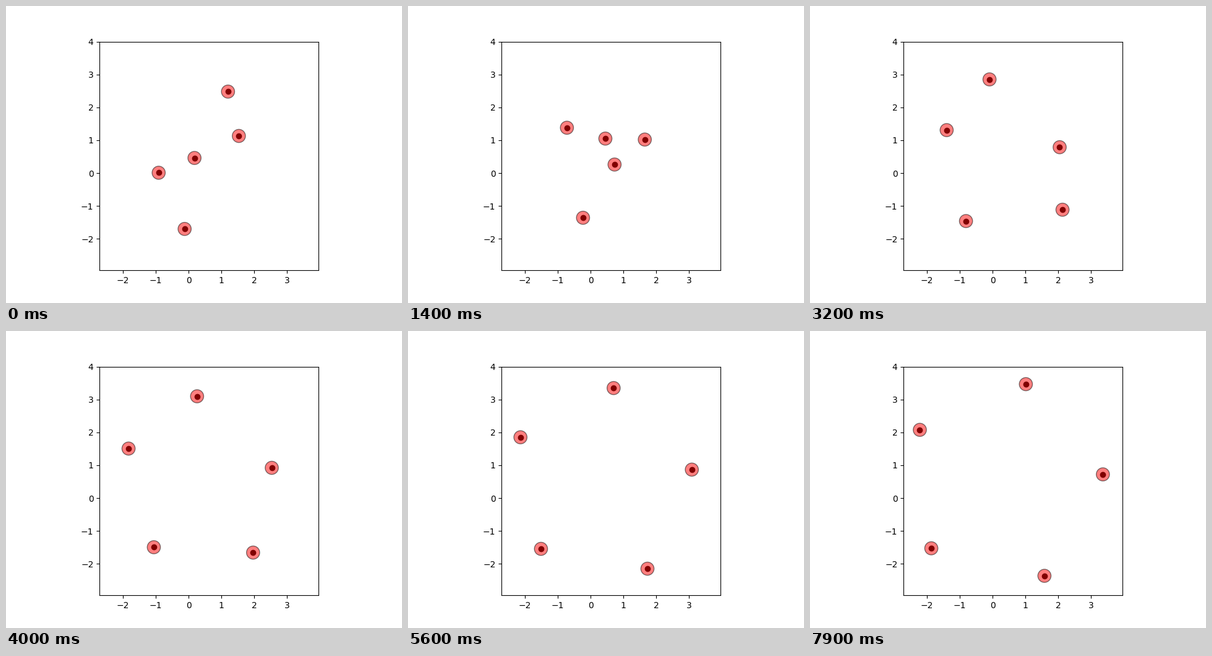
Animation of 640 by 480 pixels, one loop 8000 ms. Source, as a matplotlib script:

```python
import numpy as np
import matplotlib.pyplot as plt
from matplotlib.animation import FuncAnimation
from matplotlib.patches import Circle

FRAMES, INTERVAL = 80, 100
SETTLE = 2.4                  # s, from here the agents relax to a pentagon
RADIUS, HEADING = 3.12, 1.30  # final pentagon

# Key poses of the five agents as complex numbers x + iy
START = np.array([-0.91 + 0.01j, 0.18 + 0.46j, 1.20 + 2.48j,
                  -0.12 - 1.70j, 1.53 + 1.13j])
CROSS = np.array([-0.72 + 1.38j, 0.73 + 0.26j, 1.65 + 1.02j,
                  -0.23 - 1.36j, 0.45 + 1.05j])
OPEN = np.array([-0.52 + 2.38j, 1.41 + 0.47j, 2.16 - 0.32j,
                 -0.50 - 1.36j, -0.68 + 1.20j])


def relax(t):
    """Let the distortions of the ring fade while it grows and turns."""
    s = t - SETTLE
    mean, skew, star, fold, ring = np.fft.fft(OPEN) / 5
    fade = np.exp(-0.6 * s - 0.27 * s * s)
    r = RADIUS + (abs(ring) - RADIUS) * np.exp(-0.53 * s)
    a = HEADING + (np.angle(ring) - HEADING) * np.exp(-0.42 * s)
    modes = [mean, skew * np.exp(-(0.37 + 0.06j) * s),
             star * fade * np.exp(-0.25j * s), fold * fade, r * np.exp(1j * a)]
    return np.fft.ifft(modes) * 5


# Cubic paths through the key poses and an early point of the relaxation
knots = np.array([0, 1.4, SETTLE, 4.0])
cubic = np.linalg.solve(np.vander(knots), [START, CROSS, OPEN, relax(4.0)])


def pose(t):
    if t < SETTLE:
        return (np.vander([t], 4) @ cubic)[0]
    return relax(t)


fig, ax = plt.subplots(figsize=(6.4, 4.8), dpi=100)
ax.set_aspect("equal")
ax.set_xlim(-2.71, 3.95)
ax.set_ylim(-2.96, 4.0)
ax.set_xticks(range(-2, 4))
ax.set_yticks(range(-2, 5))

bodies = [ax.add_patch(Circle((0, 0), 0.2, fc="red", ec="black", alpha=0.5))
          for _ in START]
cores, = ax.plot([], [], "o", color="maroon")


def update(i):
    z = pose(i * INTERVAL / 1000)
    for body, p in zip(bodies, z):
        body.center = p.real, p.imag
    cores.set_data(z.real, z.imag)
    return *bodies, cores


anim = FuncAnimation(fig, update, frames=FRAMES, interval=INTERVAL,
                     repeat=True, repeat_delay=0)
plt.show()
```
